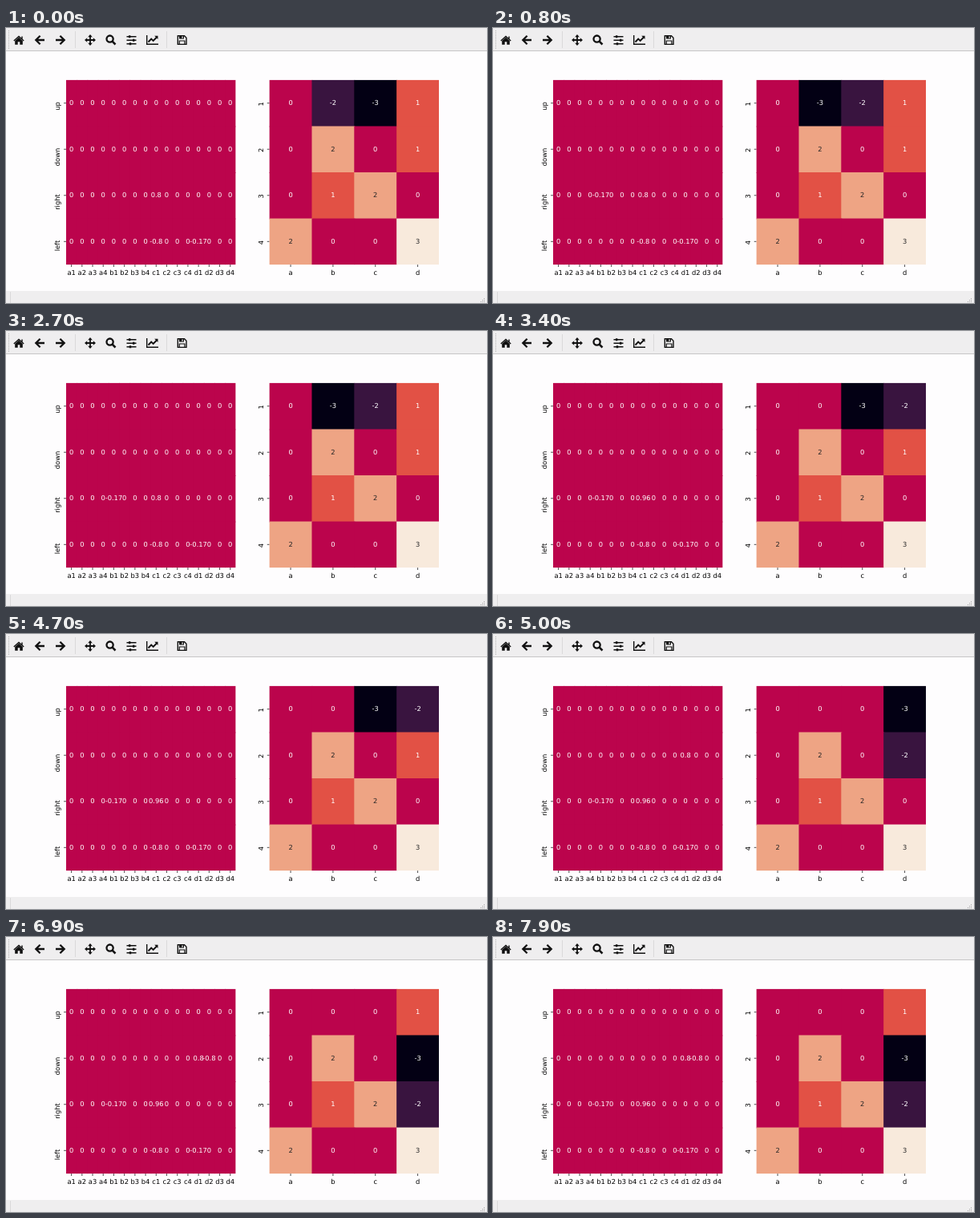
Write an HTML page that moves like this. It is 600x343 px and loops after 8000 ms.

```html
<!DOCTYPE html>
<html lang="en">
<head>
<meta charset="utf-8">
<title>Q table and grid</title>
<style>
  html, body { margin: 0; width: 100%; height: 100%; overflow: hidden; background: #fefdfe; }
  svg { display: block; width: 100vw; height: 100vh; }
  text {
    font: 8.33px "DejaVu Sans", sans-serif; fill: #000; text-anchor: middle;
    text-rendering: geometricPrecision;
  }
  .line { fill: none; stroke: #111; stroke-width: 2.3; }
  .thin { fill: none; stroke: #111; stroke-width: 1.4; }
</style>
</head>
<body>
<svg viewBox="0 0 600 343" preserveAspectRatio="none">
  <rect width="600" height="343" fill="#fefdfe"/>
  <rect width="600" height="28" fill="#efeeef"/>
  <rect y="28" width="600" height="1" fill="#c6c5c6"/>
  <rect y="328" width="600" height="15" fill="#efeeef"/>
  <path d="M3.5 3V26" stroke="#b5b4b5" stroke-dasharray="1 1"/>
  <path d="M86.5 4V25M200.5 4V25M5.5 329V343" stroke="#dad9da"/>
  <path d="M592 341.5h6M594 339.5h4M596 337.5h2" stroke="#a5a4a5" stroke-dasharray="1 1"/>

  <g fill="#111">
    <path d="M16 11.8l4.8 4.2v4.7h-3.5v-3.4h-2.6v3.4h-3.5v-4.7z"/>
    <path class="thin" d="M9.8 16L16 10.5L22.2 16M20 10.6v3"/>
    <path id="arrow" class="line" d="M48 15H38M42.6 9.7L37.3 15L42.6 20.3"/>
    <use href="#arrow" transform="matrix(-1 0 0 1 110 0)"/>
    <path class="line" style="stroke-width:1.8" d="M100 15h10M105 10v10"/>
    <path d="M105 8l2.8 3.2h-5.6zM105 22l2.8-3.2h-5.6zM98 15l3.2-2.8v5.6zM112 15l-3.2-2.8v5.6z"/>
    <circle class="line" cx="129.6" cy="13.6" r="4.1"/>
    <path class="line" style="stroke-width:2.6" d="M132.6 16.6L136.5 20.5"/>
    <path class="thin" d="M150.5 10.7h12M150.5 15.2h12M150.5 19.7h12"/>
    <path d="M153 9.2h2.4v3H153zM158 13.7h2.4v3H158zM153.8 18.2h2.4v3h-2.4z"/>
    <path class="thin" d="M175.7 9V20.3H190"/>
    <path class="line" style="stroke-width:1.9" d="M177.5 17.5L181.2 13.5L183.7 16L188 11.5"/>
    <path d="M185.2 9.7h4.3v4.3z"/>
    <path class="thin" d="M214.3 9.7h8.2l2.5 2.5v8.2h-10.7z"/>
    <path d="M216 9.5h6v4h-6z"/>
    <path d="M219.3 10.5h1.5v2h-1.5z" fill="#efeeef"/>
    <path class="thin" style="stroke-width:1.2" d="M216.3 20v-4h6.6v4"/>
  </g>
  <g id="plots"></g>
</svg>
<script>
const LOOP = 8000;
// Two side-by-side axes with a gap of a fifth of their width.
const LEFT = 75, RIGHT = 540, TOP = 64.9, HEIGHT = 230.2;
const WIDTH = (RIGHT - LEFT) / 2.2;
const COLORS = { '-3': '#030014', '-2': '#39143f', 0: '#bb044c', 1: '#e25145', 2: '#eea484', 3: '#f8eadc' };
const ACTIONS = ['up', 'down', 'right', 'left'];
const COLUMNS = [...'abcd'], ROWS = [...'1234'];
const STATES = COLUMNS.flatMap(c => ROWS.map(r => c + r));
const REWARDS = [[0, 0, 0, 1], [0, 2, 0, 1], [0, 1, 2, 0], [2, 0, 0, 3]];

// Agent cell (-3), the cell it heads for (-2), and the table entries learned so far.
const STEPS = [
  { at: 0, agent: 'c1', next: 'b1', learned: { 'right c1': 0.8, 'left c1': -0.8, 'left d1': -0.17 } },
  { at: 800, agent: 'b1', next: 'c1', learned: { 'right b1': -0.17 } },
  { at: 2800, agent: 'c1', next: 'd1', learned: { 'right c1': 0.96 } },
  { at: 4900, agent: 'd1', next: 'd2', learned: { 'down d1': 0.8 } },
  { at: 6900, agent: 'd2', next: 'd3', learned: { 'down d2': -0.8 } }
];
STEPS.forEach((step, i) => { step.learned = { ...STEPS[i - 1]?.learned, ...step.learned }; });

const plots = document.getElementById('plots');

function add(tag, attrs, content = '') {
  const el = document.createElementNS('http://www.w3.org/2000/svg', tag);
  for (const name in attrs) el.setAttribute(name, attrs[name]);
  el.textContent = content;
  return plots.appendChild(el);
}

function heatmap(left, columns, rows) {
  const w = WIDTH / columns.length, h = HEIGHT / rows.length;
  const right = left + WIDTH, bottom = TOP + HEIGHT;
  const tick = d => add('path', { d, stroke: '#000', 'stroke-width': 0.7 });
  columns.forEach((name, i) => {
    const x = left + (i + 0.5) * w;
    tick(`M${x} ${bottom}v2.9`);
    add('text', { x, y: bottom + 12.5 }, name);
  });
  rows.forEach((name, i) => {
    const y = TOP + (i + 0.5) * h;
    tick(`M${left} ${y}h-2.9`);
    add('text', { transform: `translate(${left - 7.8} ${y - 1.5}) rotate(-90)`, style: 'text-anchor:end' }, name);
  });
  // Cells overlap their neighbours by a pixel so that no seams show.
  const cells = rows.flatMap((row, r) => columns.map((column, c) => {
    const x = left + c * w, y = TOP + r * h;
    const box = add('rect', {
      x, y, fill: COLORS[0],
      width: Math.min(w + 1, right - x), height: Math.min(h + 1, bottom - y)
    });
    return { row, column, r, c, x, y, box };
  }));
  for (const cell of cells) {
    cell.label = add('text', { x: cell.x + w / 2, y: cell.y + h / 2 + 2.4 });
    cell.label.style.fill = '#fff';
  }
  return cells;
}

const table = heatmap(LEFT, STATES, ACTIONS);
const grid = heatmap(RIGHT - WIDTH, COLUMNS, ROWS);

function show({ agent, next, learned }) {
  for (const { row, column, label } of table) label.textContent = learned[`${row} ${column}`] ?? 0;
  for (const { row, column, r, c, box, label } of grid) {
    const name = column + row;
    const value = name === agent ? -3 : name === next ? -2 : REWARDS[r][c];
    box.setAttribute('fill', COLORS[value]);
    label.textContent = value;
    label.style.fill = value > 1 ? '#262626' : '#fff';
  }
}

const start = performance.now();
let current;
function frame(now) {
  const time = Math.max(0, now - start) % LOOP;
  const step = STEPS.findLast(s => s.at <= time);
  if (step !== current) show(current = step);
  requestAnimationFrame(frame);
}
frame(start);
</script>
</body>
</html>
```
